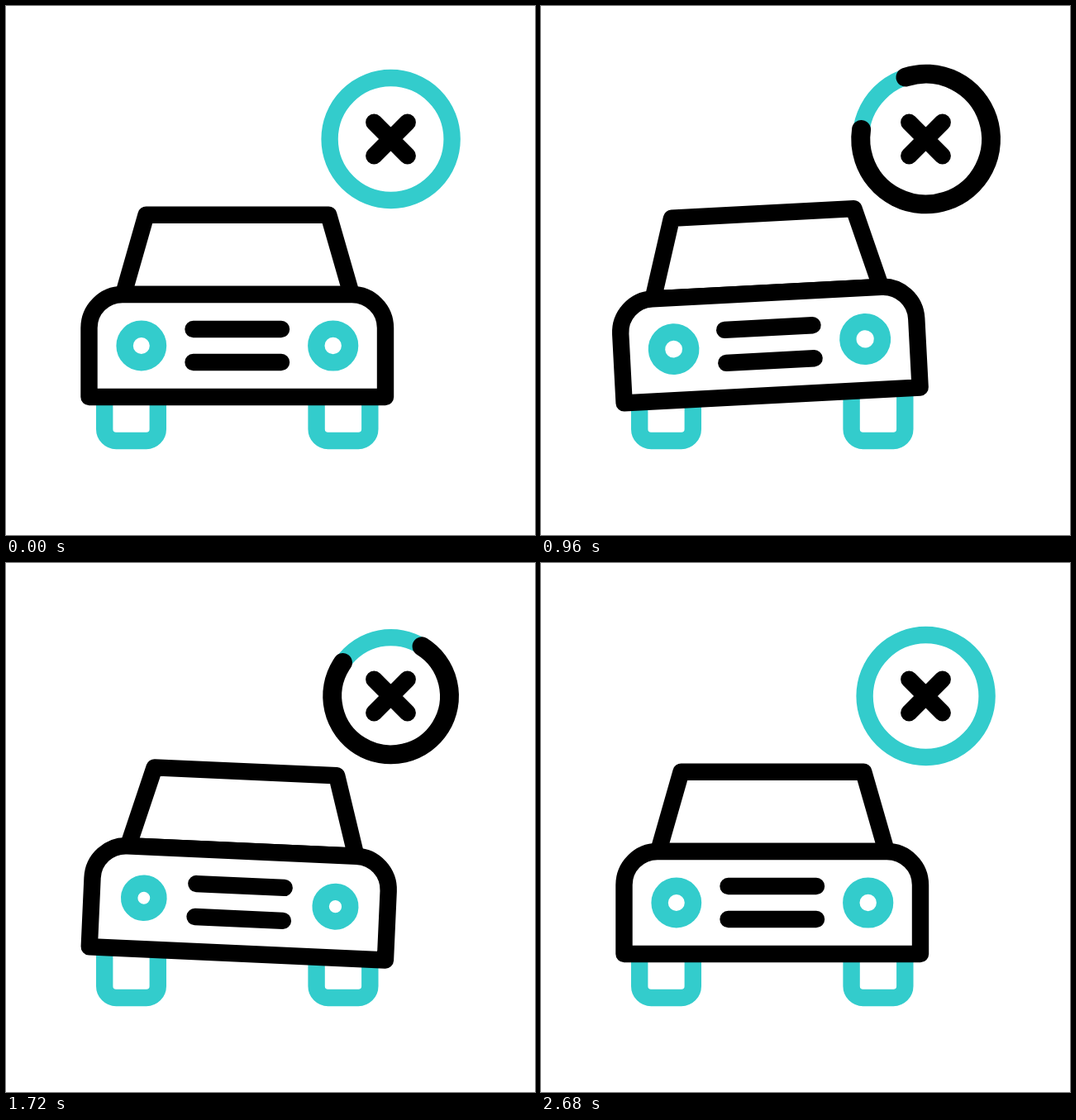
An HTML page with a canvas for the animation above (3000 ms loop, 640 by 640 pixels).

```html
<!DOCTYPE html>
<html>
<head>
<meta charset="utf-8">
<style>
  html, body { margin: 0; width: 100%; height: 100%; overflow: hidden; background: #fff; }
  canvas { display: block; width: 640px; height: 640px; }
</style>
</head>
<body>
<canvas id="stage" width="640" height="640"></canvas>
<script>
const ctx = document.getElementById('stage').getContext('2d');
const TEAL = '#33cccc', BLACK = '#000', LINE = 20.4, LOOP = 3000;

const bodyShape = new Path2D('M100.5 473V389.5A40.5 40.5 0 0 1 141 349H418.5A40.5 40.5 0 0 1 459 389.5V473Z');
const cabin = new Path2D('M142 349L169.5 252.7H390.3L418 349Z');
const grille = new Path2D('M226.5 391H333M226.5 431H333');
const cross = new Path2D('M445.3 140.8L485.7 181.2M485.7 140.8L445.3 181.2');
const wheels = new Path2D('M119.2 440V512a14 14 0 0 0 14 14H169.8a14 14 0 0 0 14 -14V440' +
  'M375.6 440V512a14 14 0 0 0 14 14H426.3a14 14 0 0 0 14 -14V440');

// Each ray runs from its inner to its outer end.
const leftRays = [[63.5, 366.5, 45.2, 355.5], [56, 414, 35, 414], [63.5, 464.5, 45.2, 475.5]];
const rightRays = [[487, 364, 505, 353], [494.5, 414, 515, 414], [487, 462.5, 505, 472.8]];

// Keys are [time, value] pairs joined by sine easing.
const ringKeys = [[0, 74], [540, 67.8], [1080, 80.3], [1550, 67.8], [2070, 80.3], [2680, 74]];
const lampKeys = [[0, 20.2], [630, 17], [1200, 22.8], [1640, 17.2], [2100, 23], [2680, 20.2]];
const tiltKeys = [[340, 0], [930, -3.05], [1580, 3], [2160, 0]];
const liftKeys = [[340, 0], [720, 11], [1170, -12.5], [1540, 11], [1900, -12], [2150, 0]];

const clamp = x => Math.min(1, Math.max(0, x));
const ease = x => (1 - Math.cos(Math.PI * clamp(x))) / 2;

function tween(keys, t) {
  let value = keys[0][1];
  for (let i = 1; i < keys.length; i++) {
    const [start, from] = keys[i - 1], [end, to] = keys[i];
    if (t >= start) value = from + (to - from) * ease((t - start) / (end - start));
  }
  return value;
}

function stroke(path, color, width = LINE) {
  ctx.strokeStyle = color;
  ctx.lineWidth = width;
  ctx.stroke(path);
}

function arc(x, y, r, color, width, from = 0, to = 360) {
  const path = new Path2D();
  path.arc(x, y, r, (from - 90) * Math.PI / 180, (to - 90) * Math.PI / 180);
  stroke(path, color, width);
}

function drawRays(rays, t, delay) {
  for (let pulse = 0; pulse < 3; pulse++) {
    const age = t - delay - 318 - pulse * 737;
    if (age <= 0 || age >= 400) continue;
    const head = ease(age / 200), tail = ease((age - 200) / 200);
    const path = new Path2D();
    for (const [x1, y1, x2, y2] of rays) {
      path.moveTo(x1 + (x2 - x1) * tail, y1 + (y2 - y1) * tail);
      path.lineTo(x1 + (x2 - x1) * head, y1 + (y2 - y1) * head);
    }
    stroke(path, TEAL);
  }
}

function drawBadge(t) {
  const r = tween(ringKeys, t);
  arc(465.6, 161, r, TEAL, LINE);
  for (const center of [920, 1640]) {
    const x = (t - center) / 385;
    if (Math.abs(x) >= 1) continue;
    const quarter = x * Math.PI / 2;
    const middle = 90 + 270 * (0.7 * Math.sin(quarter) + 0.3 * x);
    const length = 305 * Math.cos(quarter) ** 2;
    if (length > 4) arc(465.6, 161, r, BLACK, 23, middle - length / 2, middle + length / 2);
  }
  stroke(cross, BLACK);
}

function drawCar(t) {
  stroke(wheels, TEAL);
  ctx.save();
  ctx.translate(280, 475 + tween(liftKeys, t));
  ctx.rotate(tween(tiltKeys, t) * Math.PI / 180);
  ctx.translate(-280, -475);
  ctx.fillStyle = '#fff';
  for (const shape of [cabin, bodyShape]) {
    ctx.fill(shape);
    stroke(shape, BLACK);
  }
  stroke(grille, BLACK);
  const r = tween(lampKeys, t);
  arc(163.8, 411, r, TEAL, LINE);
  arc(395.7, 411, r + 0.2, TEAL, LINE);
  ctx.restore();
}

function draw(now) {
  const t = now % LOOP;
  ctx.clearRect(0, 0, 640, 640);
  ctx.lineCap = ctx.lineJoin = 'round';
  drawBadge(t);
  drawRays(leftRays, t, 0);
  drawRays(rightRays, t, 60);
  drawCar(t);
  requestAnimationFrame(draw);
}
requestAnimationFrame(draw);
</script>
</body>
</html>
```
